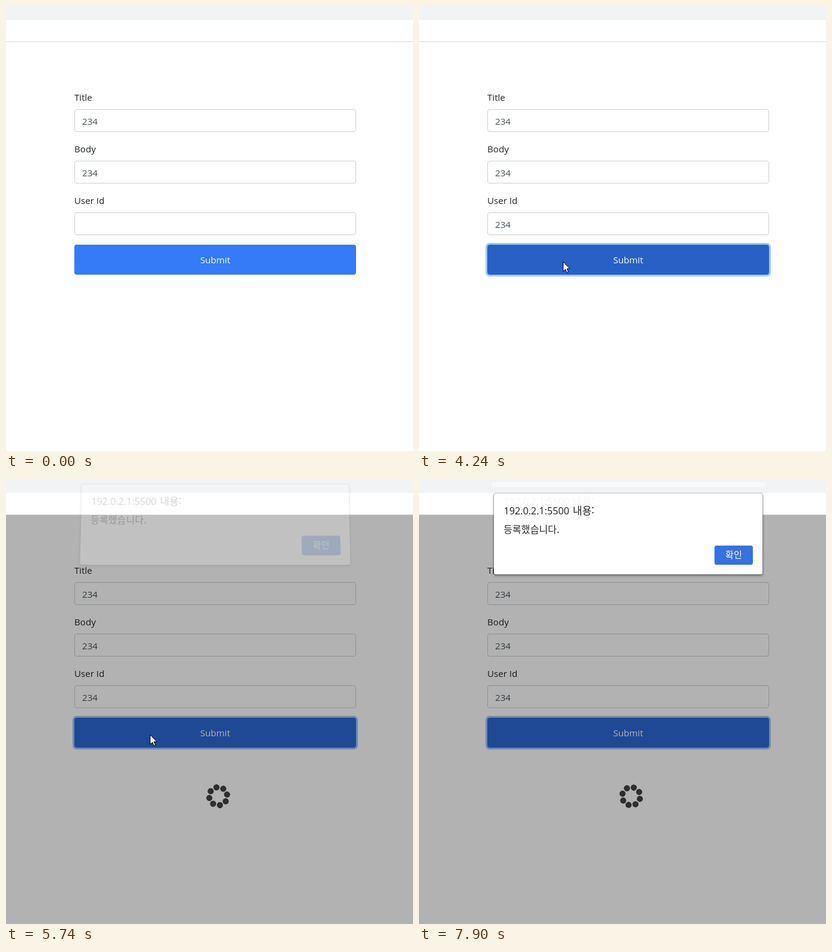
Animation of 679x742 px, one loop 7.98 s. Source, as an HTML page:

```html
<!DOCTYPE html>
<html lang="ko">
<head>
<meta charset="utf-8">
<title>Form submit</title>
<style>
  html, body { margin: 0; width: 100%; height: 100%; overflow: hidden; background: #fff; }
  svg { position: absolute; left: 0; top: 0; overflow: visible; }
  text { font-family: "Open Sans", "Noto Sans", sans-serif; font-size: 15.1px; white-space: pre; }
  .label { fill: #212529; }
  .value { fill: #495057; }
  .field { fill: #fff; stroke: #ced0d4; }
  .ko { font-family: "Noto Sans CJK KR", "Noto Sans CJK JP", "Noto Sans CJK", sans-serif; }
  #dialog { position: absolute; left: 125px; top: 24px; width: 448px; height: 135px;
    background: #fff; border-radius: 3px;
    box-shadow: 0 0 0 1px rgba(0,0,0,.2), 0 2px 4px rgba(0,0,0,.42); }
  #dialog .head { font-size: 16.1px; fill: #202124; }
  #dialog .head.ko { font-size: 17px; }
  #dialog .body { font-size: 16.1px; fill: #2c2d30; }
  #dialog .ok { font-size: 15.2px; fill: #fff; }
</style>
</head>
<body>
<svg width="679" height="742">
  <rect width="679" height="23" fill="#f1f3f4"/>
  <rect y="59" width="679" height="1" fill="#dadce0"/>
  <g id="form"></g>
  <rect id="inputRing" x="112.5" y="342.5" width="473" height="41" rx="5" fill="none" stroke="#357af7" stroke-width="3"/>
  <rect id="inputEdge" x="114.5" y="344.5" width="469" height="37" rx="3.5" fill="none" stroke="#8fb7fb"/>
  <text id="userId" class="value" x="127" y="370"></text>
  <rect id="caret" y="353" width="1" height="21" fill="#333"/>
  <g id="stepper">
    <rect x="556" y="353" width="15" height="20" fill="#efefef"/>
    <path d="M559.5 361h8l-4-4.5zM559.5 365.5h8l-4 4.5z" fill="#404040"/>
  </g>
  <rect id="buttonRing" x="112.5" y="396.5" width="473" height="53" rx="5" fill="none" stroke="#488cfa" stroke-width="3"/>
  <rect id="button" x="114" y="398" width="470" height="50" rx="4"/>
  <text x="349" y="429" text-anchor="middle" fill="#fff">Submit</text>
  <g id="busy">
    <rect y="60" width="679" height="682" fill="#000" opacity=".3"/>
    <g id="dots" fill="#2e2e2e"></g>
  </g>
  <rect id="band" x="122" y="5" width="455" height="8" rx="2" fill="#f8f9fa"/>
</svg>

<div id="dialog">
  <svg width="448" height="135">
    <g id="echo" opacity=".04">
      <text class="head" x="16.5" y="19">192.0.2.1:5500</text>
      <text class="head ko" x="131.5" y="19">내용:</text>
    </g>
    <text class="head" x="16.5" y="35">192.0.2.1:5500</text>
    <text class="head ko" x="131.5" y="35">내용:</text>
    <text class="body ko" x="16" y="66">등록했습니다.</text>
    <rect id="okRing" x="367.5" y="86.5" width="65" height="33" rx="3.5" fill="none" stroke="#c3d6f8"/>
    <rect id="ok" x="368" y="87" width="64" height="32" rx="3.5"/>
    <text class="ok ko" x="400" y="108" text-anchor="middle">확인</text>
  </svg>
</div>

<svg width="679" height="742">
  <path id="arrow" d="M.5 .5V16.5L4.3 13 6.8 18.6 9.2 17.6 6.8 12H11.6Z" fill="#fff" stroke="#000" stroke-linejoin="round"/>
  <path id="beam" d="M-3 -7.5H-1L.5 -6.5 2 -7.5H4M.5 -6.5V6.5M-3 7.5H-1L.5 6.5 2 7.5H4" fill="none" stroke="#000"/>
</svg>

<script>
const LOOP = 7980;
const UPDATE = 77.8;      // screen refresh interval
const TURN = 1500;        // one turn of the spinner
const BLINK = 525;        // half a caret blink

// Moments of the story, in ms
const ENTER = 460, FOCUS = 1015, LEAVE = 3180, PRESS = 4010;
const BUSY = 4330, ALERT = 5740, EXIT = 7122, BLUR = 7500;
const KEYS = [1990, 2240, 2460];

const BASE = [53, 122, 247], HOVER = [44, 105, 212], DOWN = [40, 96, 197];

const $ = id => document.getElementById(id);
const set = (id, name, value) => $(id).setAttribute(name, value);
const fade = (id, value) => set(id, 'opacity', value);
const show = (id, on) => { $(id).style.display = on ? '' : 'none'; };
const mix = (a, b, k) => a.map((v, i) => v + (b[i] - v) * k);

// Smooth step from 0 to 1
function ramp(t, from, length = 150) {
  const k = Math.min(1, Math.max(0, (t - from) / length));
  return k * k * (3 - 2 * k);
}

const snap = t => PRESS + Math.floor((t - PRESS + 6) / UPDATE) * UPDATE;

function build() {
  $('form').innerHTML = ['Title', 'Body', 'User Id'].map((label, i) => `
    <g transform="translate(0 ${i * 86})">
      <text class="label" x="114" y="158">${label}</text>
      <rect class="field" x="114.5" y="172.5" width="469" height="37" rx="3.5"/>
      <text class="value" x="127" y="198">${i < 2 ? '234' : ''}</text>
    </g>`).join('');
  $('dots').innerHTML = Array.from({ length: 8 }, (_, i) =>
    `<circle cx="15.1" r="5.1" transform="rotate(${i * 45})"/>`).join('');
}

function drawInput(t, s) {
  const focus = ramp(s, FOCUS - 40) - ramp(s, PRESS - 10);
  fade('inputRing', focus * .27);
  fade('inputEdge', focus);

  const past = KEYS.filter(k => t >= k);
  const since = t - (past.at(-1) || FOCUS);
  $('userId').textContent = '234'.slice(0, past.length);
  set('caret', 'x', Math.round(127 + past.length * 8.64));
  show('caret', t >= FOCUS && t < PRESS && since % (2 * BLINK) < BLINK);
  show('stepper', s >= FOCUS - 100 && s < PRESS + 70);
}

function drawButton(s) {
  const hover = ramp(s, 710) - ramp(s, 860) + ramp(s, LEAVE + 250);
  const press = ramp(s, PRESS - 10) - ramp(s, BUSY);
  const fill = mix(mix(BASE, HOVER, hover), DOWN, press);
  set('button', 'fill', `rgb(${fill.map(Math.round)})`);
  fade('buttonRing', ramp(s, PRESS - 10) * .5);
}

function drawBusy(t, s) {
  show('busy', t >= BUSY);
  const angle = 15 + (s - BUSY) / TURN * 360;
  set('dots', 'transform', `translate(354 529) rotate(${angle})`);
}

function drawDialog(t, s) {
  const open = ramp(s, ALERT - 10, 230);
  const away = 1 - open;
  const box = $('dialog').style;
  show('dialog', t >= ALERT);
  box.opacity = .2 + .8 * open;
  box.transform = away
    ? `translateY(${-16 * away}px) perspective(1000px) rotateX(${6 * away}deg)`
    : 'none';
  show('band', open === 1);
  show('echo', open === 1);
  set('ok', 'fill', s < BLUR ? '#5086e3' : '#3871e0');
  show('okRing', s < BLUR);
}

function drawPointer(t, s) {
  const enter = ramp(s, ENTER, 540), down = ramp(s, LEAVE, 520), exit = ramp(s, EXIT, 250);
  const x = Math.round(262 - 23 * enter + down + 421 * exit);
  const y = Math.round(523 - 151 * enter + 54 * down + 296 * exit);
  const inside = y < 382;
  const visible = t >= ENTER && s < BLUR;
  show('arrow', visible && !inside);
  show('beam', visible && inside);
  for (const id of ['arrow', 'beam']) set(id, 'transform', `translate(${x} ${y})`);
}

function draw(t) {
  const s = snap(t);
  drawInput(t, s);
  drawButton(s);
  drawBusy(t, s);
  drawDialog(t, s);
  drawPointer(t, s);
}

build();
const start = performance.now();
function tick() {
  draw((performance.now() - start) % LOOP);
  requestAnimationFrame(tick);
}
tick();
</script>
</body>
</html>
```
